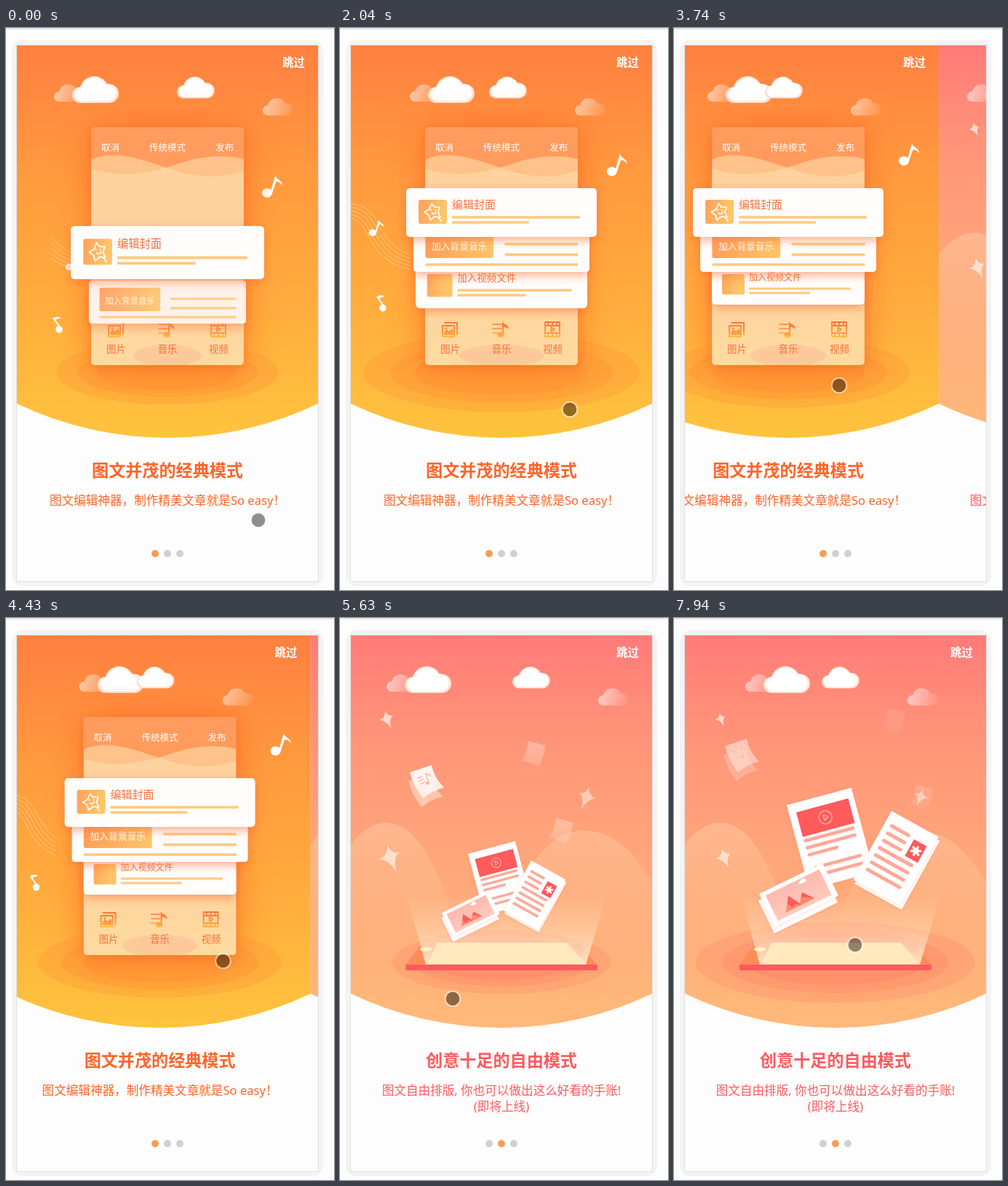
Recreate the animation shown at these times as an HTML page with a canvas. Size 451 by 772 pixels, loop 8 s.

```html
<!DOCTYPE html>
<html lang="zh-CN">
<head>
<meta charset="utf-8">
<style>
html, body { margin: 0; width: 100%; height: 100%; overflow: hidden; background: #fdfdfd; }
canvas { display: block; }
</style>
</head>
<body>
<canvas id="stage" width="451" height="772"></canvas>
<script>
const c = document.getElementById('stage').getContext('2d');
const LOOP = 8000, PAGE = 414, MID = 222;
const FONT = '"Noto Sans", "Noto Sans CJK SC", "Noto Sans CJK", sans-serif';

// Piecewise linear values: keys are [time, v1, v2, ...]
function track(t, keys) {
  let i = 1;
  while (i < keys.length - 1 && t >= keys[i][0]) i++;
  const a = keys[i - 1], b = keys[i];
  const k = Math.min(1, Math.max(0, (t - a[0]) / (b[0] - a[0])));
  return a.slice(1).map((v, j) => v + (b[j + 1] - v) * k);
}

function at(x, y, draw, { sx = 1, sy = sx, turn = 0, alpha = 1 } = {}) {
  c.save();
  c.translate(x, y);
  c.rotate(turn * Math.PI / 180);
  c.scale(sx, sy);
  c.globalAlpha *= alpha;
  draw();
  c.restore();
}

function fade(x0, y0, x1, y1, ...colors) {
  const g = c.createLinearGradient(x0, y0, x1, y1);
  colors.forEach((color, i) => g.addColorStop(i / (colors.length - 1), color));
  return g;
}

function box(x, y, w, h, r, fill) {
  c.beginPath();
  c.roundRect(x, y, w, h, r);
  c.fillStyle = fill;
  c.fill();
}

function oval(x, y, rx, ry, fill) {
  c.beginPath();
  c.ellipse(x, y, rx, ry, 0, 0, 7);
  c.fillStyle = fill;
  c.fill();
}

function shape(d, fill) {
  c.fillStyle = fill;
  c.fill(new Path2D(d));
}

function outline(d, color, width) {
  c.strokeStyle = color;
  c.lineWidth = width;
  c.lineCap = c.lineJoin = 'round';
  c.stroke(new Path2D(d));
}

// y is the middle of the line
function text(s, x, y, size, color, weight = 400, align = 'left') {
  c.font = `${weight} ${size}px ${FONT}`;
  c.textAlign = align;
  c.fillStyle = color;
  c.fillText(s, x, y + size * 0.37);
}

function glow(color, blur, dy, draw) {
  c.save();
  c.shadowColor = color;
  c.shadowBlur = blur;
  c.shadowOffsetY = dy;
  draw();
  c.restore();
}

// ---- shared scenery ----

function backdrop(...colors) {
  const a = Math.atan2(432, 207);
  c.beginPath();
  c.moveTo(15, 24);
  c.lineTo(429.5, 24);
  c.lineTo(429.5, 516);
  c.arc(MID, 84, 479, a, Math.PI - a);
  c.closePath();
  c.fillStyle = fade(0, 24, 0, 560, ...colors);
  c.fill();
}

const CLOUD = 'M11 17A11 11 0 0 0 11 39H51A13 13 0 0 0 51 13Q49 12 48 13A20 20 0 0 0 11 17Z';

function cloud(x, y, s, edge) {
  at(x, y, () => {
    shape(CLOUD, edge);
    c.clip(new Path2D(CLOUD));
    glow('#fff', 5, 0, () => at(3.5, 2, () => shape(CLOUD, '#fff'), { sx: 0.89 }));
  }, { sx: s });
}

function ghostCloud(x, y) {
  at(x, y, () => shape(CLOUD, fade(0, 0, 64, 20, 'rgba(255,255,255,.6)', 'rgba(255,255,255,.08)')), { sx: 0.65 });
}

function clouds(phase, edge) {
  const d = phase * 0.0147 - 12;
  ghostCloud(66 + d, 76);
  cloud(91 + d, 64, 1, edge);
  cloud(235 - d, 65, 0.81, edge);
  ghostCloud(353 - d, 95);
}

const rippleSize = phase => 138 + 0.018 * Math.min(phase, 3000) - 0.028 * Math.max(0, phase - 3000);

function ripples(phase, color) {
  const r = rippleSize(phase);
  for (const k of [1, 0.81, 0.63]) oval(MID, 473, r * k, r * k * (0.2 + 0.09 * k), color);
}

function caption(title, lines, color) {
  text('跳过', 380, 47, 15.4, '#fff', 700);
  text(title, MID, 607, 23.1, color, 700, 'center');
  lines.forEach((s, i) => text(s, MID, 649 + 22 * i, 16.6, color, 400, 'center'));
}

// ---- first page ----

const INK = '#f5703a', LINE = '#ffc97f';
const warm = (x, w) => fade(x, 0, x + w, 10, '#ff9c58', '#ffc468');

function bigNote() {
  oval(-7, 8.5, 7, 6.3, '#fff');
  shape('M-2.5 8L4-15C7-9 14-9 14-2C11-6 8-7 5.5-7L0 9Z', '#fff');
}

function smallNote() {
  oval(2, 6, 4.8, 4.8, '#fff');
  shape('M5 4L-3-7Q1-9 5-10Q-2-13-7-9L4 6Z', '#fff');
}

function staff(t) {
  c.save();
  c.beginPath();
  c.rect(63 - t * 0.044, 200, 150, 160);
  c.clip();
  for (let i = 0; i < 5; i++) {
    const y = 241 + 5 * i;
    outline(`M10 ${y}C${64 - 4 * i} ${y} ${44 - 4 * i} ${y + 60} 104 ${y + 72}`, 'rgba(255,235,200,.5)', 1);
  }
  c.restore();
}

function phone(size) {
  glow('rgba(255,105,35,.75)', 50, 0, () => box(117, 136, 210, 327, 5, '#ff9b5c'));
  glow('rgba(245,100,30,.5)', 14, 3, () => box(117, 136, 210, 327, 5, '#ff9b5c'));
  c.save();
  c.clip();
  c.beginPath();
  c.roundRect(117, 136, 210, 327, 5);
  c.clip();
  const veil = 'rgba(253,222,172,.58)';
  shape('M117 181C150 165 190 182 230 195S300 205 327 196V463H117Z', veil);
  shape('M117 193C170 210 210 195 245 184S310 176 327 180V463H117Z', veil);
  shape('M117 330H327V463H117Z', fade(0, 330, 0, 463, 'rgba(255,220,160,0)', 'rgba(255,220,160,.8)'));
  oval(MID, 450, size * 0.31, 15, 'rgba(255,185,150,.5)');
  c.restore();
  text('取消', 131, 164, 12.5, '#fff', 500);
  text('传统模式', 197, 164, 12.5, '#fff', 500);
  text('发布', 288, 164, 12.5, '#fff', 500);
  ['图片', '音乐', '视频'].forEach((s, i) => text(s, 151.5 + 70.5 * i, 441, 13.5, INK, 400, 'center'));
  const tint = fade(0, -11, 0, 12, '#ff7136', '#ff8a3c', '#ffc043');
  at(151, 414, () => {
    outline('M-7-9H10V7M-10-5H6V10H-10Z', tint, 2);
    shape('M-8 8V4L-4 0L-1 3L3-1L5 4V8Z', tint);
    oval(-5, -1.5, 1.5, 1.5, tint);
  });
  at(221, 414, () => {
    outline('M-11-7H1M-11-1H1M-11 5H-3', tint, 1.6);
    shape('M2-11C4-6 11-8 11 0C8-3 6-3 4-3V7H2Z', tint);
    oval(0, 7.5, 4.5, 3.8, tint);
  });
  at(292, 414, () => {
    outline('M-10-10H10V10H-10ZM-10-5H10M-10 5H10M-6-10V-6M0-10V-6M6-10V-6M-6 6V10M0 6V10M6 6V10', tint, 1.8);
    outline('M-2-3L3 0L-2 3Z', tint, 1.5);
  });
}

function card([w, h, bottom, alpha], baseW, baseH, content) {
  at(MID - w / 2, bottom - h, () => {
    glow('rgba(250,110,50,.6)', 14, 4, () => box(0, 0, baseW, baseH, 5, '#fffdfc'));
    content();
  }, { sx: w / baseW, sy: h / baseH, alpha });
}

const bar = (x0, x1, y, h = 3.5) => box(x0, y - h / 2, x1 - x0, h, 1, LINE);

function cards(phase) {
  card(track(phase, [[816, 200, 57, 412, 0.12], [1626, 224, 64, 398, 0.92], [2440, 266, 76, 389, 1],
    [2856, 236, 67.4, 385, 1], [3200, 210, 60, 380, 1]]), 210, 60, () => {
    box(14, 18, 31, 28, 2, warm(14, 31));
    text('加入视频文件', 51, 23, 12, INK);
    bar(51, 191, 38, 3);
    bar(51, 135, 44, 3);
  });
  card(track(phase, [[816, 216, 59, 406, 0.88], [1626, 266, 73, 366, 1], [2250, 242, 66.4, 335, 1]]), 266, 73, () => {
    box(18, 12, 103, 40, 3, warm(18, 103));
    text('加入背景音乐', 69.5, 34, 14, '#fff', 500, 'center');
    bar(138, 249, 31, 4);
    bar(138, 249, 47, 4);
    bar(18, 249, 62, 4);
  });
  card(track(phase, [[816, 266, 73, 345, 1], [1626, 266, 70, 301, 1], [1950, 262, 67, 287, 1]]), 262, 67, () => {
    box(17, 16, 39, 33, 3, warm(17, 39));
    outline('M35 21L39 26L46 26L44 33L47 40L39 39L33 44L31 37L25 33L32 29ZM35 34Q38 37 41 33M44 40L48 45', '#fff', 1.7);
    oval(34, 30, 1, 1, '#fff');
    oval(40, 30, 1, 1, '#fff');
    text('编辑封面', 63, 22, 15, INK);
    bar(63, 239, 40);
    bar(63, 169, 47);
  });
}

function classicPage(t) {
  t = Math.min(t, 3060);
  const phase = t + 816;
  backdrop('#ff8040', '#ff9a3e', '#ffad3c', '#ffc33e');
  clouds(phase, '#ffd9c4');
  ripples(phase, 'rgba(255,120,45,.2)');
  staff(t);
  at(366 + t * 0.0072, 218 - t * 0.0144, bigNote);
  at(71 - t * 0.0069, 408 - t * 0.0144, smallNote);
  const [x, y, alpha] = track(t, [[1000, 92, 322, 1], [1500, 70, 305, 1], [2040, 50, 275, 1], [2600, 26, 252, 0.6], [2850, 14, 248, 0]]);
  at(x, y, bigNote, { sx: 0.74, alpha });
  phone(rippleSize(phase));
  cards(phase);
  caption('图文并茂的经典模式', ['图文编辑神器，制作精美文章就是So easy！'], '#ff6428');
}

// ---- second page ----

const RED = '#ff5a5c', ROSE = '#ffa899';

function star(x, y, sx, sy, alpha) {
  at(x, y, () => shape('M-3-17Q1-4 14-6Q4 0 10 22Q1 5-15 3Q-2 0-3-17Z', '#fff0e6'), { sx, sy, alpha });
}

function looseSheet(x, y, alpha) {
  at(x, y, () => shape('M-6-18L17-12Q16 5 7 18Q-2 10-15 10Q-8-3-6-18Z',
    fade(0, -18, 0, 18, '#ffe3da', 'rgba(255,225,215,.55)')), { alpha });
}

function noteSheets(x, y, alpha) {
  const sheet = 'M-23-19L7-29Q10-12 24 2Q8 6-5 17Q-18 0-23-19Z';
  at(x, y, () => {
    at(-2, 12, () => shape(sheet, 'rgba(255,240,232,.5)'));
    shape(sheet, fade(0, -29, 0, 17, '#fff', 'rgba(255,245,240,.85)'));
    outline('M-12-11L-6-13M-10-7L-4-10M-8-3L-2-6M-1-17L3-5M-1-17Q4-17 5-13', '#ffab8c', 1.3);
    oval(1, -4, 2.5, 2, '#ffab8c');
  }, { alpha });
}

function tray() {
  shape('M90 477L110 450H120V477ZM354 477L330 449H320V477Z', '#ff8c58');
  shape('M118 476L91 380H367L338 476Z', fade(0, 476, 0, 380, 'rgba(255,232,200,.95)', 'rgba(255,232,205,.35)', 'rgba(255,232,210,0)'));
  shape('M134 446H312L338 476H120Z', '#ffe9bd');
  oval(118, 455, 8, 2.8, '#fff0d4');
  box(90, 476, 264, 8, 2, RED);
}

const sheetShadow = draw => glow('rgba(255,110,90,.25)', 4, 1, draw);

function videoDoc() {
  sheetShadow(() => box(0, 0, 92, 120, 0, '#fff'));
  box(10, 13, 74, 35, 0, RED);
  outline('M56 30A9 9 0 1 1 38 30A9 9 0 1 1 56 30M45 26L51 30L45 34Z', ROSE, 1.6);
  [[10, 82, 54], [10, 82, 64], [10, 54, 74], [14, 82, 93], [14, 82, 104]].forEach(
    ([a, b, y]) => box(a, y - 2.3, b - a, 4.6, 2, ROSE));
}

function textDoc() {
  sheetShadow(() => box(4, 4, 74, 108, 0, '#fff'));
  sheetShadow(() => box(0, 0, 74, 108, 0, '#fff'));
  for (let i = 0; i < 7; i++) box(8, 15.5 + 11.4 * i, i < 3 ? 31 : 55, 5, 2.5, ROSE);
  box(46, 19, 20, 26, 0, RED);
  outline('M56 26V38M50.5 29L61.5 35M61.5 29L50.5 35', '#fff', 3.4);
}

function pictureDoc() {
  sheetShadow(() => box(-5, 8, 97, 50, 0, '#fff'));
  sheetShadow(() => box(0, 0, 97, 50, 0, '#fff'));
  box(7, 6, 82, 39, 0, fade(0, 6, 0, 45, '#ffb9ae', '#ffcabd'));
  shape('M22 39L35 20L46 39ZM42 39L54 24L66 39Z', '#ff8a6c');
  shape('M35 20L46 39L38 34L33 37L29 29ZM54 24L66 39L58 34L50 29Z', RED);
  oval(61, 11, 6, 2.2, '#fff');
  oval(62, 9.5, 3, 2.5, '#fff');
}

function freePage(t) {
  const phase = Math.max(0, t - 4950);
  const k = (phase - 680) / 2310;
  const pulse = 0.87 + 0.13 * Math.cos((phase - 680) / 1540 * 2 * Math.PI);
  backdrop('#ff7b78', '#ff9378', '#ffa27a', '#ffae7a', '#ffb97a');
  const hill = fade(0, 280, 0, 470, 'rgba(255,205,165,.5)', 'rgba(255,195,140,0)');
  shape('M15 312C45 270 88 268 120 325C145 370 160 420 185 470H15Z', hill);
  shape('M200 470C240 380 270 295 333 292C375 292 405 320 429.5 365V470Z', hill);
  clouds(phase, '#ffdcc0');
  ripples(phase, 'rgba(255,95,85,.17)');
  star(64, 138, 0.66 * pulse, 0.66 * pulse, 0.75);
  star(68, 328, pulse, pulse, 0.72);
  looseSheet(265 + 35 * k, 187 - 45 * k, 0.45 - 0.3 * k);
  looseSheet(303 + 36 * k, 293 - 46 * k, 0.45 - 0.25 * k);
  star(340, 245, -0.83 * pulse, 0.83 * pulse, 0.55);
  noteSheets(119 - 26 * k, 231 - 36 * k, 0.95 - 0.45 * k);
  tray();
  const sx = 0.73 + 0.27 * k;
  at(176 - 21 * k, 324 - 67 * k, videoDoc, { sx, turn: -15 });
  at(263 + 36 * k, 333 - 68 * k, textDoc, { sx, turn: 29 });
  at(140 - 23 * k, 405 - 26 * k, pictureDoc, { sx, turn: -26 });
  caption('创意十足的自由模式', ['图文自由排版, 你也可以做出这么好看的手账!', '(即将上线)'], '#ff595d');
}

// ---- frame, pager and pointer ----

function pointer(t) {
  const [x, y] = track(t, [[0, 347, 676], [810, 347, 622], [1110, 344, 600], [2040, 316, 524], [3060, 295, 492],
    [3739.9, 295, 492], [3740, 227, 491], [4430, 299, 471], [4700, 170, 490], [5630, 155, 523], [6920, 235, 474], [7940, 249, 449]]);
  oval(x, y, 9.5, 9.5, 'rgba(0,0,0,.44)');
  c.beginPath();
  c.arc(x, y, 10.3, 0, 7);
  c.strokeStyle = 'rgba(255,255,255,.55)';
  c.lineWidth = 1.8;
  c.stroke();
}

function draw(now) {
  const t = now % LOOP;
  const [shift] = track(t, [[3739.9, 0], [3740, -65], [4430, -10], [4550, -60], [4700, -300], [4970, -PAGE]]);
  box(0, 0, 451, 772, 0, '#fdfdfd');
  box(0, 0, 451, 2, 0, '#e6e6e6');
  box(8, 17, 428, 750, 15, '#f3f3f3');
  box(14, 23, 416, 738, 0, '#dedede');
  box(15, 24, 414, 736, 0, '#fdfdfd');
  c.save();
  c.beginPath();
  c.rect(15, 24, 414, 736);
  c.clip();
  if (shift > -PAGE) at(shift, 0, () => classicPage(t));
  if (shift < 0) {
    c.beginPath();
    c.rect(15 + PAGE + shift, 24, PAGE, 736);
    c.clip();
    at(PAGE + shift, 0, () => {
      box(15, 24, PAGE, 736, 0, '#fdfdfd');
      freePage(t);
    });
  }
  c.restore();
  const active = t < 4700 ? 0 : 1;
  for (let i = 0; i < 3; i++) oval(205 + 17 * i, 722, 5, 5, i === active ? '#ff9a55' : '#d0d0d0');
  pointer(t);
}

function tick() {
  draw(performance.now());
  requestAnimationFrame(tick);
}
tick();
</script>
</body>
</html>
```
